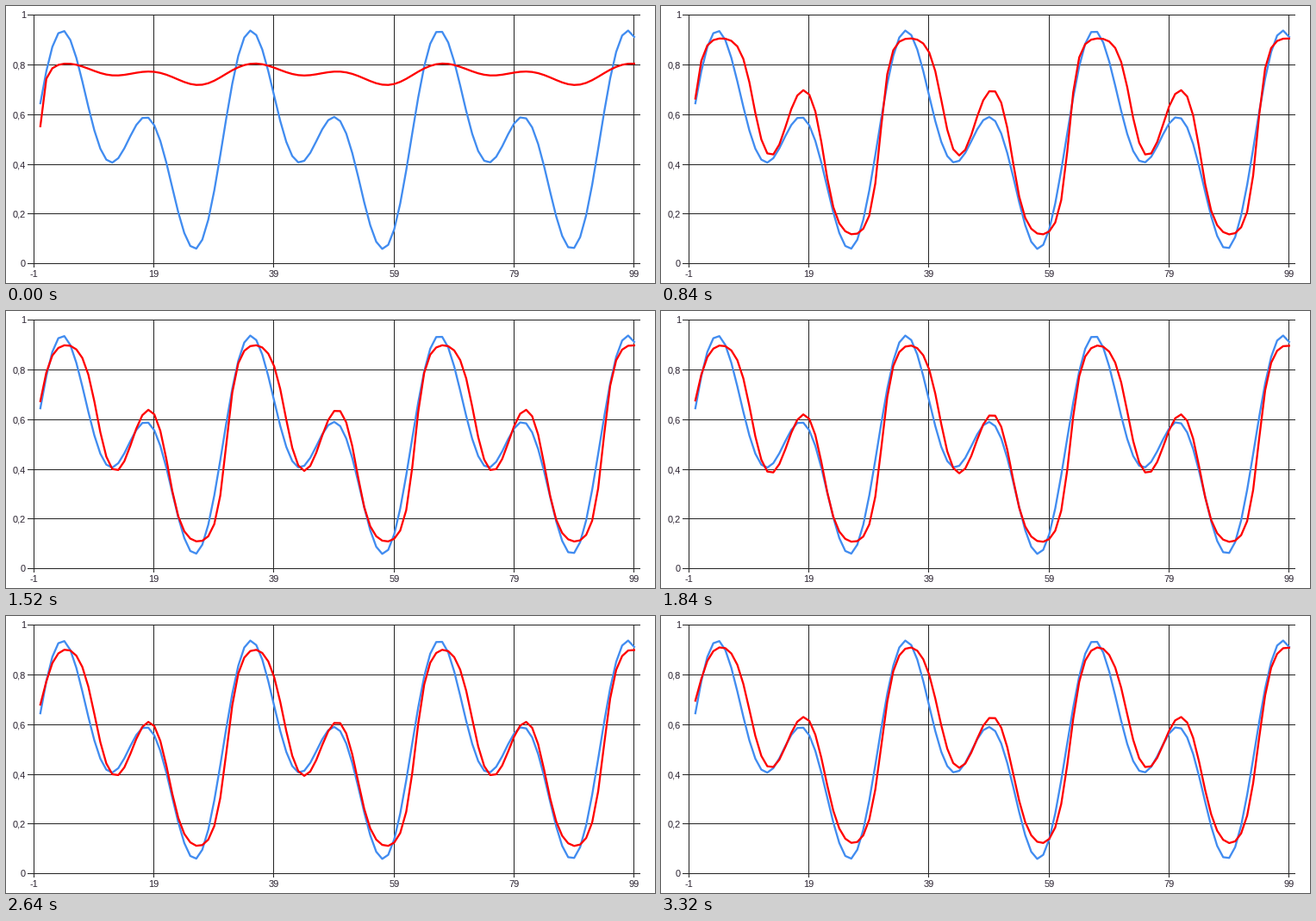
A matplotlib script for the animation above (3.36 s loop, 753 by 322 pixels).

```python
import math

import numpy as np
import matplotlib.pyplot as plt
from matplotlib.animation import FuncAnimation
from matplotlib.patches import Rectangle

W, H, DPI = 753, 322, 100
PX = 72 / DPI                 # one pixel in points
FRAMES, STEP = 84, 40         # 3360 ms loop
X0, DX = 32.4, 6.959          # sample index to pixels
Y0, DY = 299.3, 288.6         # value to pixels
LAG = 0.41                    # memory of the learned curve
PEAK = 1.66                   # largest value of the lagged wave
SETTLED = 0.48                # seconds until the shape is learned

plt.rcParams["font.family"] = "Liberation Sans"

n = np.arange(1, 101)
xs = X0 + DX * n


def wave(i):
    return np.sin(0.2 * i) + np.sin(0.4 * i)


def to_y(v):
    return Y0 - DY * v


# Exponentially lagged wave, without any start-up effect.
history = np.arange(40)
lagged = (1 - LAG) * (wave(np.arange(101)[:, None] - history) @ LAG ** history)


def learned(t):
    """Network output at t seconds: a squashed, lagged copy of the wave."""
    age = max(t - SETTLED, 0)
    fade = math.exp(-age ** 2)
    bend = 0.76 - 0.185 * age
    rest = 0.45 - 0.85 * fade
    bias = 0.05 + 0.08 * (age - 1.47) ** 2
    bulge = 0.26 * fade - 0.09

    q = lagged[1:] + (rest - lagged[0]) * LAG ** n
    shape = (bias + 2.145 * np.tanh(bend * q) / math.tanh(bend * PEAK)
             + bulge * (1 - (q / PEAK) ** 2))
    untrained = 1.19 + 0.145 * lagged[1:] - 0.22 ** (n - 1.0)

    u = min(max((t - 0.04) / (SETTLED - 0.04), 0), 1)
    mix = math.sin(math.pi / 2 * u)
    z = untrained + (shape - untrained) * mix
    return 1 / (1 + np.exp(-z))


fig = plt.figure(figsize=(W / DPI, H / DPI), dpi=DPI, facecolor="white")
ax = fig.add_axes([0, 0, 1, 1])
ax.set_xlim(-0.5, W - 0.5)
ax.set_ylim(H - 0.5, -0.5)
ax.axis("off")


def pixel_bar(x, y, w, h):
    ax.add_patch(Rectangle((x - 0.5, y - 0.5), w, h, lw=0,
                           color="#242424", zorder=1))


label = dict(fontsize=11 * PX, color="#2a2230", va="baseline")
for k in range(6):
    x = math.floor(32.5 + 139.2 * k)
    pixel_bar(x, 10, 1, 294)
    ax.text(x, 314.5, str(20 * k - 1), ha="center", **label)

    y = math.floor(299.5 - 57.75 * k)
    pixel_bar(25, y, 711, 1)
    ax.text(22.5, y + 4, f"{k / 5:g}".replace(".", ","), ha="right", **label)

ax.plot(xs, to_y(0.5 + 0.25 * wave(n)), color="#418CF0", lw=2.3 * PX, zorder=2)
red, = ax.plot(xs, to_y(learned(0)), color="#FF0000", lw=2.3 * PX, zorder=3)


def update(frame):
    red.set_ydata(to_y(learned(frame * STEP / 1000)))
    return red,


anim = FuncAnimation(fig, update, frames=FRAMES, interval=STEP,
                     repeat=True, repeat_delay=0, blit=False)
plt.show()
```
